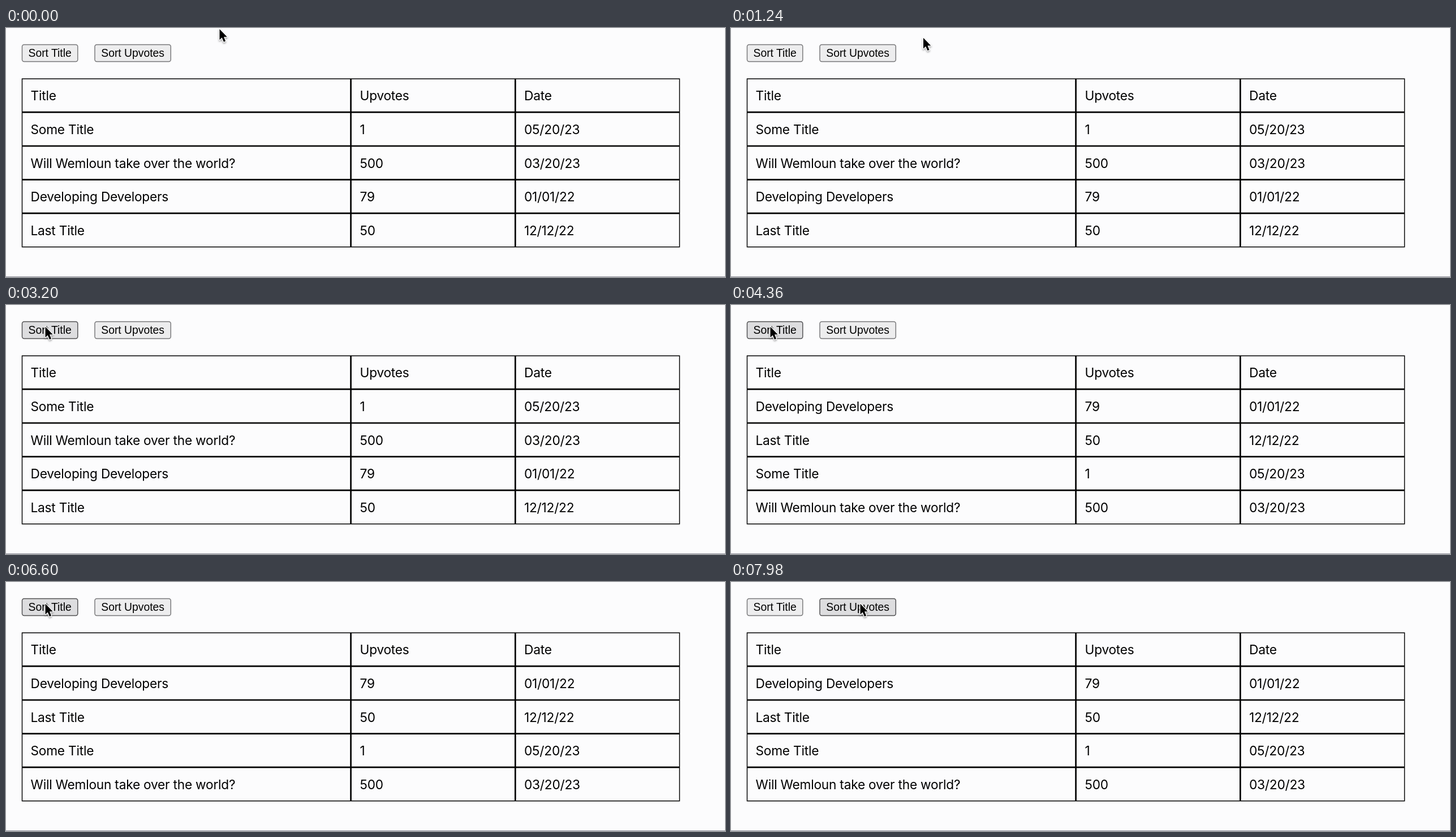
An HTML page that plays this animation: 1271x441 px, repeating every 8 s.

```html
<!DOCTYPE html>
<html lang="en">
<head>
<meta charset="utf-8">
<title>Sortable table</title>
<style>
  html, body { margin: 0; width: 100%; height: 100%; overflow: hidden; background: #fcfcfd; }
  svg { display: block; }
  .cell { font: 22.7px Inter, sans-serif; font-optical-sizing: none; letter-spacing: -.01em; }
  .button text { font: 19.33px "Liberation Sans", Arial, sans-serif; }
  .button rect { fill: #ededee; stroke: #767678; stroke-width: 1.45; }
  .button.hover rect { fill: #dddddf; stroke: #4f4f51; }
  .grid { fill: none; stroke: #000; }
  .cursor { filter: drop-shadow(0 2px 1.5px #0005); }
</style>
</head>
<body>
<svg width="1271" height="441" viewBox="0 0 1271 441">
  <rect y="440" width="1271" height="1" fill="#8e8e98"/>
  <g id="buttons"></g>
  <path class="grid" stroke-width="1.45" d="M28.5 90H1190.6V387.8H28.5Z"/>
  <path class="grid" stroke-width="2.7" d="M28 149.2H1191M28 209H1191M28 268.7H1191M28 328.2H1191M609.6 90V388M900.3 90V388"/>
  <g id="table"></g>
  <path id="cursor" class="cursor" d="M0 0V19L4.2 15 7.4 22.5 10.6 21.2 7.5 13.7H13.3Z"
    stroke="#fff" stroke-width="2.6" stroke-linejoin="round" paint-order="stroke"/>
</svg>
<script>
const LOOP = 8000, SORT_TIME = 3700;
const $ = id => document.getElementById(id);

const header = ['Title', 'Upvotes', 'Date'];
const posts = [
  ['Some Title', 1, '05/20/23'],
  ['Will Wemloun take over the world?', 500, '03/20/23'],
  ['Developing Developers', 79, '01/01/22'],
  ['Last Title', 50, '12/12/22']
];
const byTitle = [...posts].sort((a, b) => a[0] < b[0] ? -1 : 1);
const columns = [43.5, 625.5, 916];

const buttons = [
  { label: 'Sort Title', x: 28.5, width: 98.3 },
  { label: 'Sort Upvotes', x: 157, width: 134.3 }
];
const TOP = 29.5, HEIGHT = 30;

$('buttons').innerHTML = buttons.map(({ label, x, width }) => `<g class="button">
  <rect x="${x}" y="${TOP}" width="${width}" height="${HEIGHT}" rx="3.5"/>
  <text x="${x + width / 2}" y="50.8" text-anchor="middle">${label}</text></g>`).join('');
const buttonNodes = [...$('buttons').children];

// Cursor moves: start, end, then the position reached
const home = [377.5, 2];
const moves = [
  [200, 800, 340, 17.5],
  [1280, 1700, 69.5, 38.5],
  [7500, 7840, 228.5, 38.5]
];

function cursorAt(t) {
  let [x, y] = home;
  for (const [start, end, toX, toY] of moves) {
    const p = Math.min(1, Math.max(0, (t - start) / (end - start)));
    const ease = p * p * (3 - 2 * p);
    x += (toX - x) * ease;
    y += (toY - y) * ease;
  }
  return [x, y];
}

let shownRows;
function showRows(rows) {
  if (rows === shownRows) return;
  shownRows = rows;
  $('table').innerHTML = [header, ...rows].map((row, r) => row.map((text, c) =>
    `<text class="cell" x="${columns[c]}" y="${128 + r * 59.8}">${text}</text>`).join('')).join('');
}

function draw() {
  const t = performance.now() % LOOP;
  const [x, y] = cursorAt(t);
  showRows(t < SORT_TIME ? posts : byTitle);
  buttons.forEach((b, i) => buttonNodes[i].classList.toggle('hover',
    x > b.x && x < b.x + b.width && y > TOP && y < TOP + HEIGHT));
  $('cursor').setAttribute('transform', `translate(${x} ${y})`);
  requestAnimationFrame(draw);
}
draw();
</script>
</body>
</html>
```
